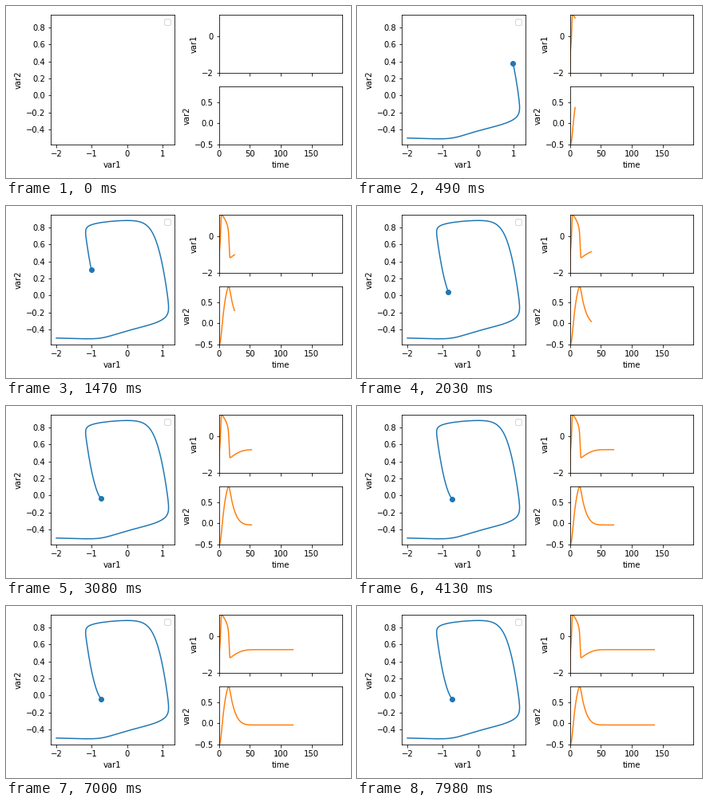
Animation of 432x216 px, one loop 8000 ms. Source, as a matplotlib script:

```python
import numpy as np
import matplotlib.pyplot as plt
from matplotlib.animation import FuncAnimation

plt.rcParams.update({"font.family": "DejaVu Sans", "font.size": 10})

DT, T_END = 0.1, 200
TICK, HOLD = 20, 70          # ms per drawn frame, ms per animation step
LOOP = 8000
POINTS_PER_STEP = 12


def flow(s, a=0.7, b=0.8, tau=12.5, current=0.3):
    """FitzHugh-Nagumo vector field."""
    v, w = s
    return np.array([v - v**3 - w + current, (v + a - b * w) / tau])


def integrate(start, n):
    path = np.empty((n, 2))
    path[0] = start
    for i in range(n - 1):
        s = path[i]
        k1 = flow(s)
        k2 = flow(s + DT / 2 * k1)
        k3 = flow(s + DT / 2 * k2)
        k4 = flow(s + DT * k3)
        path[i + 1] = s + DT / 6 * (k1 + 2 * k2 + 2 * k3 + k4)
    return path


def limits(values, margin=0.0):
    pad = margin * np.ptp(values)
    return values.min() - pad, values.max() + pad


t = np.arange(0, T_END, DT)
v, w = integrate((-2, -0.5), len(t)).T

fig = plt.figure(figsize=(6, 3), dpi=72)
grid = fig.add_gridspec(2, 2)
phase = fig.add_subplot(grid[:, 0])
top = fig.add_subplot(grid[0, 1])
bottom = fig.add_subplot(grid[1, 1], sharex=top)

phase.set(xlim=limits(v, 0.05), ylim=limits(w, 0.05),
          xlabel="var1", ylabel="var2")
phase.legend(handles=[], loc="upper right")
top.set(xlim=(t[0], t[-1]), ylim=limits(v), ylabel="var1")
top.tick_params(labelbottom=False)
bottom.set(ylim=limits(w), xlabel="time", ylabel="var2")
fig.tight_layout()

orbit, = phase.plot([], [], color="C0")
dot, = phase.plot([], [], "o", color="C0")
trace_v, = top.plot([], [], color="C1")
trace_w, = bottom.plot([], [], color="C1")


def draw(frame):
    n = (frame * TICK + TICK // 2) // HOLD * POINTS_PER_STEP
    orbit.set_data(v[:n], w[:n])
    dot.set_data(v[:n][-1:], w[:n][-1:])
    trace_v.set_data(t[:n], v[:n])
    trace_w.set_data(t[:n], w[:n])
    return orbit, dot, trace_v, trace_w


anim = FuncAnimation(fig, draw, frames=LOOP // TICK, interval=TICK,
                     repeat=True, repeat_delay=0, blit=False)
plt.show()
```
